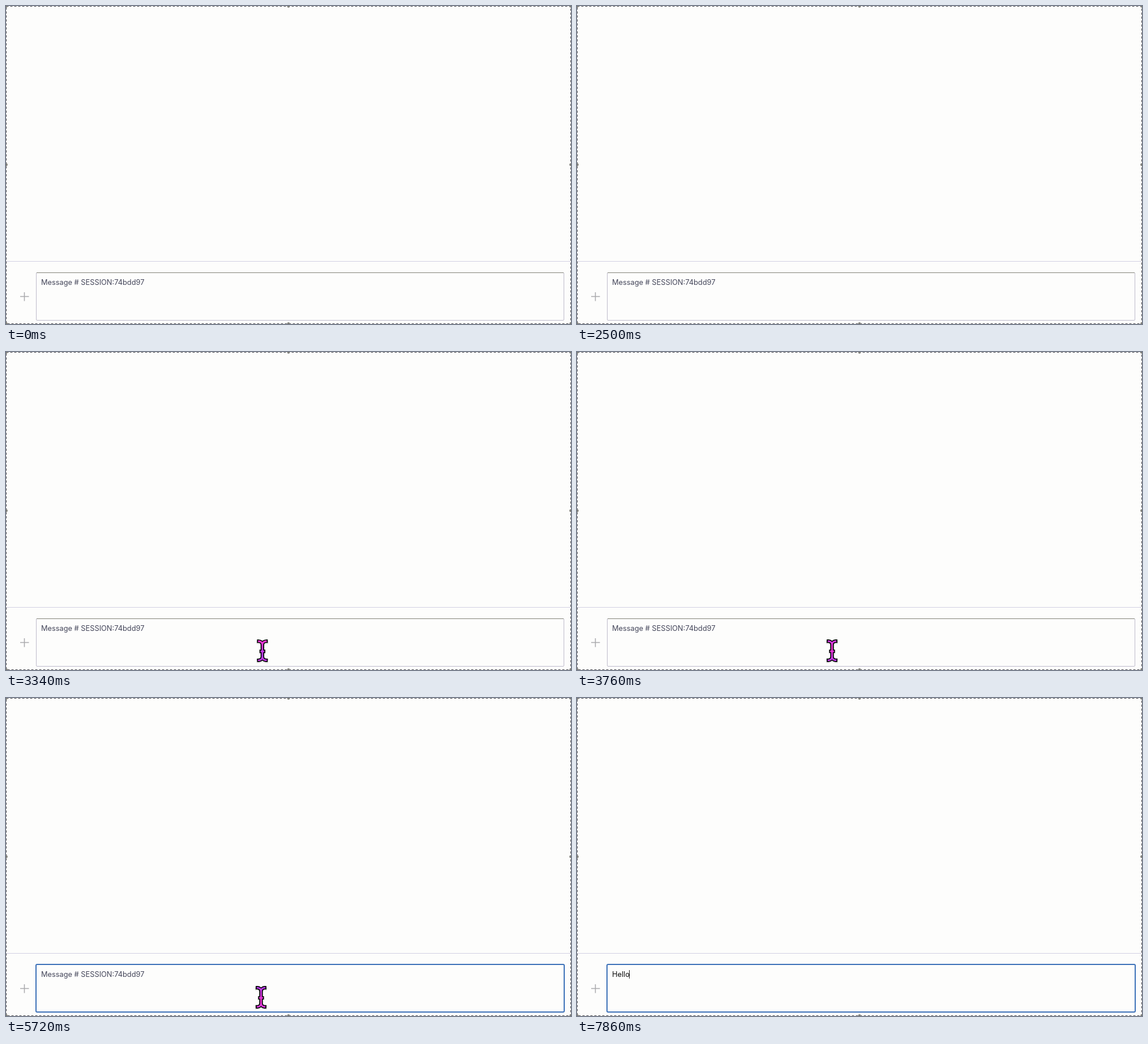
Write an HTML page that moves like this. It is 998 px wide and 561 px high and loops after 8000 ms.

```html
<!DOCTYPE html>
<html lang="en">
<head>
<meta charset="utf-8">
<title>Message box</title>
<style>
  html, body { margin: 0; width: 100%; height: 100%; overflow: hidden; background: #fdfdfc; }
  svg { display: block; width: 998px; height: 561px; }
  text { font: 12.8px Inter, Roboto, sans-serif; }
  path, line, rect { fill: none; }
</style>
</head>
<body>
<svg viewBox="0 0 998 561">
  <defs>
    <linearGradient id="tint" gradientUnits="userSpaceOnUse" x1="0" x2="0" spreadMethod="repeat">
      <stop offset="0" stop-color="#b43cf0"/>
      <stop offset=".5" stop-color="#f037d2"/>
      <stop offset="1" stop-color="#b43cf0"/>
    </linearGradient>
    <path id="beam" d="M-6.4-16.8C-2.5-16.6 0-14 0-10V10C0 14-2.5 16.6-6.4 16.8M6.4-16.8C2.5-16.6 0-14 0-10M0 10C0 14 2.5 16.6 6.4 16.8M-2 1H2"/>
  </defs>

  <path stroke="#d2cfe2" d="M1 450.5H997"/>
  <path stroke="#a9a9ab" stroke-width="1.5" d="M25 512.5H40.5M32.5 505V520.5"/>

  <g id="idle">
    <rect x="53.5" y="470.5" width="932" height="84" rx="1.5" stroke="#bdbacb"/>
    <path stroke="#828278" d="M54 470.5H985"/>
  </g>
  <rect id="focus" x="53" y="470" width="933" height="84" rx="2" stroke="#3b70b8" stroke-width="2"/>

  <text id="hint" x="62" y="492" fill="#44465a">Message # SESSION:74bdd97</text>
  <text id="typed" x="62" y="492" fill="#0c0c0c"></text>
  <line id="caret" y1="480" y2="495" stroke="#222"/>

  <rect x=".5" y=".5" width="997" height="560" stroke="#fff"/>
  <rect x=".5" y=".5" width="997" height="560" stroke="#45454a" stroke-dasharray="4 3"/>
  <g id="grips" fill="#80807a"></g>

  <g id="pointer" stroke-linecap="square">
    <use href="#beam" stroke="#000" stroke-opacity=".07" stroke-width="8" y="1.5"/>
    <use href="#beam" stroke="#000" stroke-width="6.2"/>
    <use href="#beam" stroke="url(#tint)" stroke-width="2.8"/>
  </g>
</svg>
<script>
const LOOP = 8000, ENTER = 2560, CLICK = 4200, BLINK = 500;
const keys = [6420, 6580, 6980, 7400, 7820];
const word = "Hello";
const [idle, focusBox, hint, typed, caret, grips, pointer, tint] =
  ["idle", "focus", "hint", "typed", "caret", "grips", "pointer", "tint"]
    .map(id => document.getElementById(id));

for (const x of [0.5, 499, 997.5])
  for (const y of [0.5, 280, 560.5])
    if (x !== 499 || y !== 280)
      grips.innerHTML += `<circle cx="${x}" cy="${y}" r="2.4"/>`;

const show = (el, on) => el.style.display = on ? "" : "none";
const lerp = (a, b, k) => a + (b - a) * k;
const easeOut = k => 1 - (1 - k) ** 3;
const span = (t, from, to) => Math.min(1, Math.max(0, (t - from) / (to - from)));

function movePointer(t) {
  const x = lerp(604.5, 450.5, easeOut(span(t, ENTER, 3600)));
  const y = lerp(617, 527, easeOut(span(t, ENTER, 3400))) + (t >= CLICK ? 1 : 0);
  pointer.setAttribute("transform", `translate(${x} ${y})`);
  // colour bands drift down the beam
  const crest = (t - 3060) * 0.033;
  tint.setAttribute("y1", crest);
  tint.setAttribute("y2", crest + 54);
}

function draw(t) {
  const count = keys.filter(k => t >= k).length;
  const focused = t >= CLICK;
  show(idle, !focused);
  show(focusBox, focused);
  show(hint, !count);
  typed.textContent = word.slice(0, count);
  const x = count ? Math.round(62 + typed.getComputedTextLength()) : 63;
  caret.setAttribute("x1", x - 0.5);
  caret.setAttribute("x2", x - 0.5);
  show(caret, focused && (count || Math.floor((t - CLICK) / BLINK) % 2 === 0));
  show(pointer, t >= ENTER && !count);
  movePointer(t);
}

const start = performance.now();
function tick() {
  draw((performance.now() - start) % LOOP);
  requestAnimationFrame(tick);
}
tick();
</script>
</body>
</html>
```
